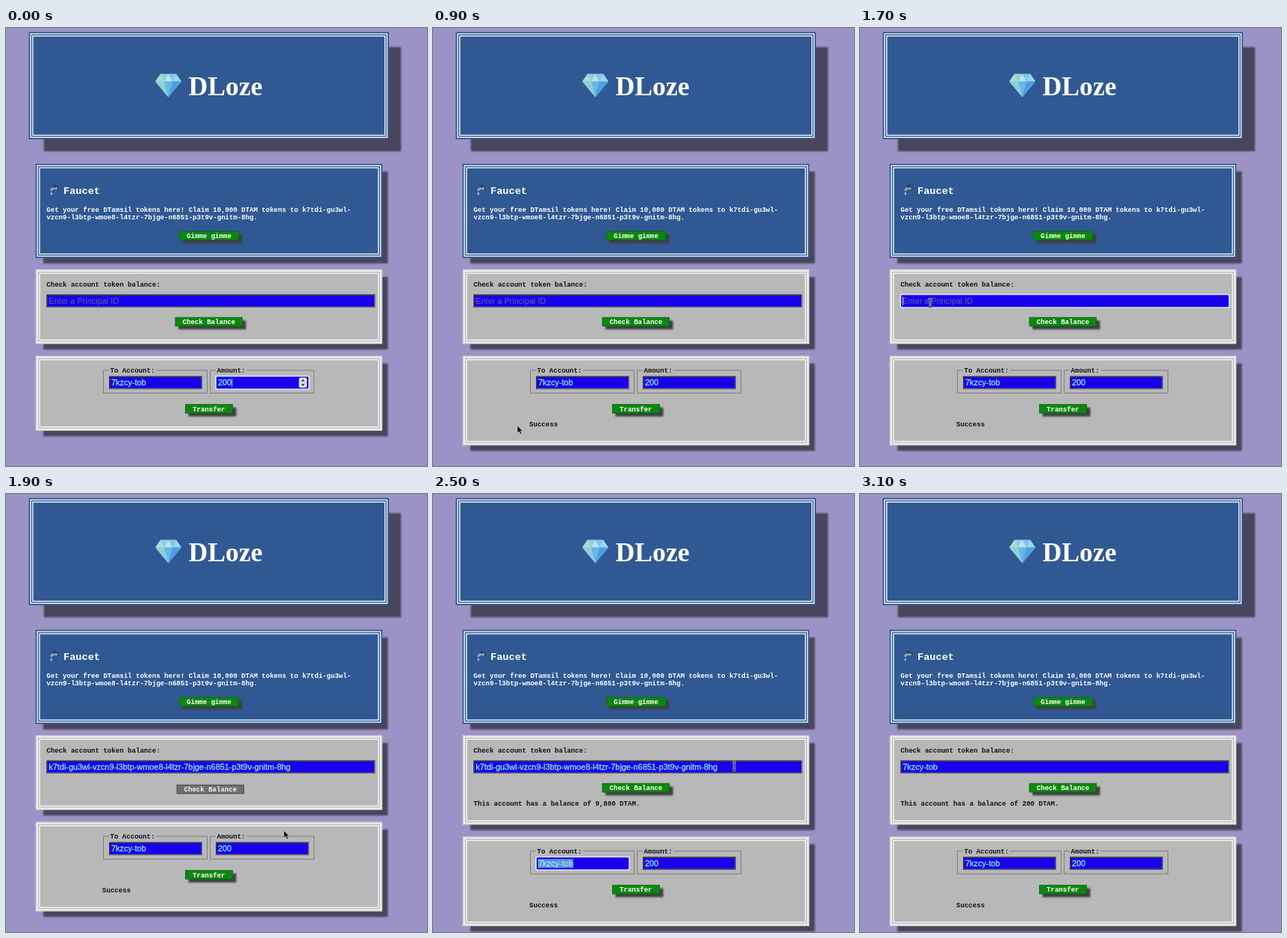
Write an HTML page that moves like this. It is 564x586 px and loops after 3.2 s.

```html
<!DOCTYPE html>
<html lang="en">
<head>
<meta charset="utf-8">
<title>Token wallet</title>
<style>
  html, body { margin: 0; width: 100%; height: 100%; overflow: hidden; background: #9b93c5; }
  svg { display: block; width: 564px; height: 586px; }
  text { white-space: pre; }
  .mono { font: bold 9.07px "Liberation Mono", "Courier New", monospace; }
  .sans { font: 10.9px "Liberation Sans", Arial, sans-serif; }
  .value { stroke: #86f0ff; stroke-width: .3px; }
  .head { font: bold 13.6px "Liberation Mono", "Courier New", monospace; }
  .title { font: bold 35.7px "Liberation Serif", "Times New Roman", serif; }
</style>
</head>
<body>
<svg id="stage" viewBox="0 0 564 586"></svg>
<script>
const STEP = 100, STEPS = 32;
const BLUE = '#305993', GRAY = '#b8b8b8', EDGE = '#d6d8d3', CYAN = '#86f0ff', SHADOW = '#49455b';
const ACCOUNT = '7kzcy-tob';
const PRINCIPAL_HEAD = 'k7tdi-gu3wl-';
const PRINCIPAL_TAIL = 'vzcn9-l3btp-wmoe8-l4tzr-7bjge-n6851-p3t9v-gnitm-8hg';

// Pointer path: step, x, y, shape (a = arrow, i = text beam)
const PATH = [
  [1, 296, 500, 'a'], [2, 272, 508, 'a'], [3, 275, 509, 'a'], [4, 345.5, 501.5, 'a'],
  [6, 320, 515, 'a'], [7, 230, 528, 'a'], [9, 113, 532, 'a'], [11, 200, 330, 'a'],
  [13, 420, 246, 'i'], [15, 300, 250, 'a'], [17, 94, 368, 'i'], [18, 275, 392, 'a'],
  [20, 469.5, 508.5, 'a'], [22, 240, 500, 'a'], [23, 160, 494, 'i'], [24, 190, 494, 'i'],
  [25, 403.5, 364, 'i'], [26, 300, 366, 'i'], [28, 275, 393, 'a'], [30, 484, 525, 'a']
];

const rect = (x, y, w, h, fill, extra = '') =>
  `<rect x="${x}" y="${y}" width="${w}" height="${h}" fill="${fill}" ${extra}/>`;
const text = (x, y, value, fill = '#111', cls = 'mono') =>
  `<text x="${x}" y="${y}" fill="${fill}" class="${cls}">${value}</text>`;
const shape = (d, fill, extra = '') => `<path d="${d}" fill="${fill}" ${extra}/>`;

function panel(x, y, w, h, fill, edge, drop, spread) {
  const line = inset => rect(x + inset, y + inset, w - 2 * inset, h - 2 * inset,
    fill, 'stroke="#f8faf8" stroke-width="1.36"');
  return rect(x + drop + spread, y + drop + spread, w - 2 * spread, h - 2 * spread, SHADOW, 'filter="url(#soft)"')
    + rect(x, y, w, h, edge) + line(2.5) + line(5.3);
}

function button(x, y, w, label, busy) {
  if (busy) {
    return rect(x + 2.5, y + 2.5, w - 1, 11.5, '#707070', 'stroke="#484848"')
      + text(x + 12, y + 11.5, label, '#f4f4f4');
  }
  return rect(x + 4.5, y + 4.5, w, 12, '#3d4045', 'filter="url(#soft)"')
    + rect(x + .5, y + .5, w - 1, 11.5, '#0d880d', 'stroke="#0a6b14"')
    + text(x + 10, y + 9.4, label, '#fff');
}

function field(x, y, w, { value = '', hint = '', focus, caret, selected } = {}) {
  const h = 17.5, base = y + 12.6;
  let out = focus
    ? rect(x, y, w, h, '#1800ec', 'rx="2" stroke="#dfeaff" stroke-width="1.6"')
    : rect(x, y, w, h, '#65656f') + shape(`M${x} ${y + h}V${y}H${x + w}l-2 2H${x + 2}V${y + h - 2}Z`, '#393947')
      + rect(x + 1.5, y + 1.5, w - 3, h - 3, '#1800ec');
  if (selected) out += rect(x + 2.5, y + 2.8, 47.5, 12, '#668cd8');
  out += value ? text(x + 3, base, value, CYAN, 'sans value') : text(x + 3, base, hint, '#62629a', 'sans');
  if (caret !== undefined) out += rect(x + 2.5 + caret, y + 3, .9, 11.5, '#c8ecff');
  return out;
}

function fieldset(x, y, label) {
  const width = label.length * 5.44;
  return rect(x + .5, y + .5, 139, 30.5, 'none', 'stroke="#7d7d7d"')
    + rect(x + 8, y - 1, width + 3, 4, GRAY) + text(x + 9.5, y + 3.4, label);
}

const spinner = (x, y) => rect(x, y, 10.5, 13.5, '#e9e9e9', 'rx="2"')
  + shape(`M${x + 2.8} ${y + 5}l2.5-3 2.5 3ZM${x + 2.8} ${y + 8.5}h5l-2.5 3Z`, '#333')
  + rect(x, y + 6.5, 10.5, .6, '#a8a8a8');

const diamond = '<g transform="translate(0 .5)">'
  + shape('M207 61H228L235 71 217.5 92 200 71Z', '#78c4ec')
  + shape('M207 61L212 71H200Z', '#acdcd2') + shape('M207 61H217.5L212 71Z', '#8fd0e6')
  + shape('M217.5 61L223 71H212Z', '#bce6ee') + shape('M217.5 61H228L223 71Z', '#82c6ea')
  + shape('M228 61L235 71H223Z', '#9ad6f0') + shape('M200 71H212L217.5 92Z', '#8fd0d6')
  + shape('M212 71H223L217.5 92Z', '#68b6ea') + shape('M223 71H235L217.5 92Z', '#4f9fe0') + '</g>';

const faucet = shape('M59.5 218v-1.5q0-3 4-3h5.5v2.6h-5q-2 0-2 2Z', '#9aa7b0')
  + shape('M62.5 210.8h5.5M65.3 210.8v3M69.5 211.5v5.5', 'none', 'stroke="#27344a" stroke-width="1.2"')
  + shape('M60.8 219q2.4 3.8 0 4.4-2.4-.6 0-4.4Z', '#8fc6ea');

function pointer(step) {
  const next = PATH.findIndex(key => key[0] >= step);
  if (step < PATH[0][0] || next < 0) return '';
  const b = PATH[next], a = b[0] === step ? b : PATH[next - 1];
  const p = a === b ? 0 : (step - a[0]) / (b[0] - a[0]);
  const x = a[1] + (b[1] - a[1]) * p, y = a[2] + (b[2] - a[2]) * p;
  const arrow = shape('M0 0V9.8L2.3 7.8 4 11.6 5.8 10.8 4.2 7.2H7Z', '#080808', 'stroke="#ddd" stroke-width=".6"');
  const beam = 'M-2.5-5.5Q0-5.5 0-4V4Q0 5.5-2.5 5.5M2.5-5.5Q0-5.5 0-4M0 4Q0 5.5 2.5 5.5';
  const ibeam = shape(beam, 'none', 'stroke="#ddd" stroke-width="2.6"') + shape(beam, 'none', 'stroke="#151515" stroke-width="1.1"');
  return `<g transform="translate(${x} ${y})">${a[3] === 'a' ? arrow : ibeam}</g>`;
}

function scene(step) {
  const between = (from, to) => step >= from && step < to;
  const success = step >= 7, checked = step >= 20;
  const shift = checked ? 19.7 : 0;
  const query = step >= 27 ? ACCOUNT : step >= 18 ? PRINCIPAL_HEAD + PRINCIPAL_TAIL : '';
  const amountFocus = step < 3;

  const header = panel(30.5, 5.4, 482.5, 143.4, BLUE, BLUE, 18.2, 2) + diamond
    + text(244.5, 90, 'DLoze', '#fff', 'title');

  const claim = panel(39.6, 181.7, 464.6, 126, BLUE, BLUE, 8.8, 1.5) + faucet
    + text(77, 221.5, 'Faucet', '#fff', 'head')
    + text(54.3, 245.8, 'Get your free DTamsil tokens here! Claim 10,000 DTAM tokens to ' + PRINCIPAL_HEAD, '#fff')
    + text(54.3, 256.3, PRINCIPAL_TAIL + '.', '#fff')
    + button(232, 271.7, 80, 'Gimme gimme');

  const balance = panel(39.7, 322.8, 464.5, 100 + shift, GRAY, EDGE, 8.8, 1.5)
    + text(54.3, 345.5, 'Check account token balance:')
    + field(54.3, 356.5, 440.4, {
        value: query, hint: 'Enter a Principal ID',
        focus: between(16, 19) || between(26, 28), caret: between(16, 18) ? 0 : undefined
      })
    + button(226.5, 386.8, 90.5, 'Check Balance', step === 19 || step === 29)
    + (checked ? text(54.3, 416.8, `This account has a balance of ${step >= 30 ? '200' : '9,800'} DTAM.`) : '');

  const transfer = `<g transform="translate(0 ${shift})">`
    + panel(39.7, 438.5, 464.5, success ? 120 : 100.5, GRAY, EDGE, 8.8, 1.5)
    + fieldset(130, 457.5, 'To Account:') + fieldset(273, 457.5, 'Amount:')
    + field(138, 465.8, 125, { value: ACCOUNT, focus: between(23, 26), selected: between(24, 26) })
    + field(281, 465.8, 125, { value: '200', focus: amountFocus, caret: amountFocus ? 18.8 : undefined })
    + (amountFocus ? spinner(392.5, 467.7) : '')
    + button(240, 503.2, 64, 'Transfer', between(3, 7))
    + (success ? text(129, 533, 'Success') : '') + '</g>';

  return '<defs><filter id="soft" x="-5%" y="-20%" width="110%" height="140%"><feGaussianBlur stdDeviation=".8"/></filter></defs>'
    + rect(0, 0, 564, 586, '#9b93c5') + header + claim + balance + transfer + pointer(step);
}

const stage = document.getElementById('stage');
const start = performance.now();
let shown = -1;

function draw(now) {
  const step = Math.floor(Math.max(0, now - start) / STEP) % STEPS;
  if (step !== shown) stage.innerHTML = scene(shown = step);
  requestAnimationFrame(draw);
}
draw(start);
</script>
</body>
</html>
```
